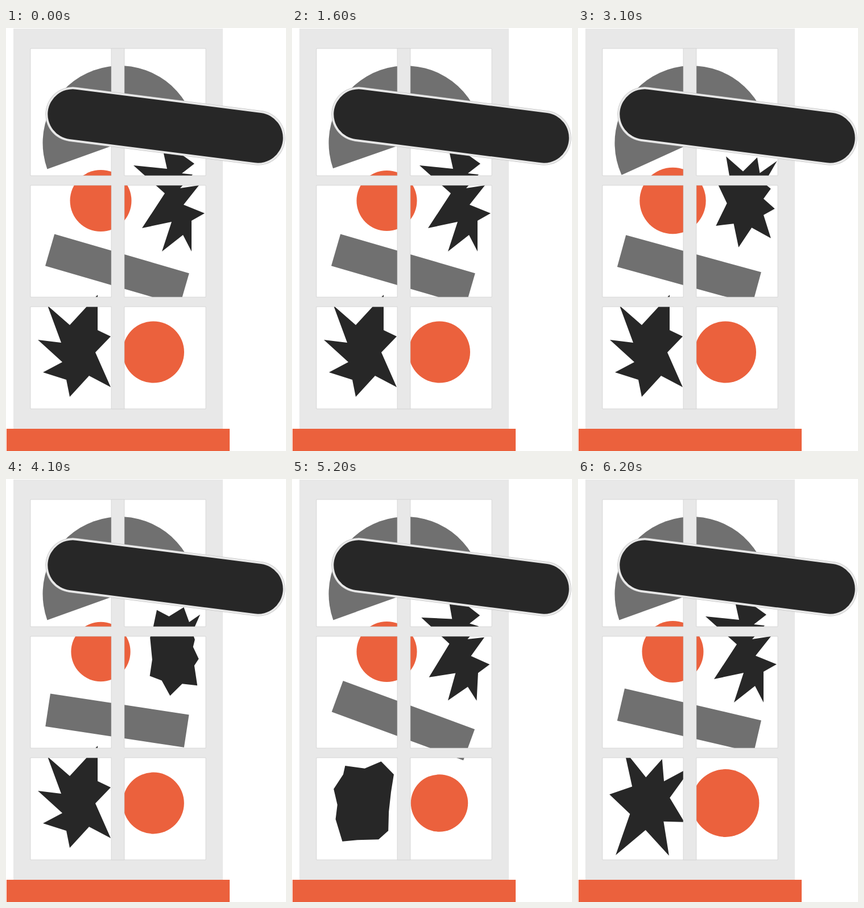
Animation, 492 px wide and 742 px high, one loop 6300 ms. Source, as an HTML page:

```html
<!DOCTYPE html>
<html lang="en">
<head>
<meta charset="utf-8">
<title>Window shapes</title>
<style>
  html, body { margin: 0; width: 100%; height: 100%; overflow: hidden; background: #fff; }
  svg { display: block; width: 492px; height: 742px; }
  .ink { fill: #272727; }
  .grey { fill: #707070; }
  .orange { fill: #eb613d; }
  .frame { fill: #e8e8e8; }
  .edge { fill: none; stroke: #c6c6c6; stroke-width: .6; }
  .pill { fill: none; stroke-linecap: round; }
</style>
</head>
<body>
<svg viewBox="0 0 492 742">
  <path id="disc" class="grey" d="M-135.5 0A135.5 135.5 0 0 1 135.5 0Z"/>
  <circle id="ballA" class="orange" cx="166.5" cy="303" r="54"/>
  <polygon id="starA" class="ink" points="273,202 303,218 331,238 309,255 328,257 306,281 339,276 312,310 349,325 326,338 326,392 311,363 274,392 291,340 239,351 279,290 224,241 283,247"/>
  <rect id="bar" class="grey" x="-123.2" y="-29" width="246.4" height="58"/>
  <polygon id="starB" class="ink" points="73,487 112,521 161,468 161,530 184,541 157,569 184,630 146,610 112,647 106,617 65,604 99,586 56,547 97,552"/>
  <circle id="ballB" class="orange" cx="259" cy="568.5" r="54"/>

  <path id="frame" class="frame" fill-rule="evenodd"/>
  <path id="edges" class="edge"/>
  <rect class="orange" x="1" y="703" width="392" height="39"/>

  <g class="pill">
    <path stroke="#bdbdbd" stroke-width="96" d="M117.3 151.3L442.7 192.7"/>
    <path stroke="#e8e8e8" stroke-width="95" d="M117.3 151.3L442.7 192.7"/>
    <path stroke="#272727" stroke-width="88" d="M117.3 151.3L442.7 192.7"/>
  </g>
</svg>
<script>
const LOOP = 6300, STEP = 100;
const $ = id => document.getElementById(id);
const mix = (a, b, f) => a + (b - a) * f;
const mixPoint = (p, q, f) => [mix(p[0], q[0], f), mix(p[1], q[1], f)];
const ease = p => (1 - Math.cos(Math.PI * p)) / 2;

// Panes of the window: two columns by three rows
const columns = [[43, 185], [208, 351]];
const rows = [[36, 259], [276, 472], [489, 668]];
const panes = columns.flatMap(([x0, x1]) =>
  rows.map(([y0, y1]) => `M${x0} ${y0}H${x1}V${y1}H${x0}Z`)).join('');
$('frame').setAttribute('d', 'M13 1H381V703H13Z' + panes);
$('edges').setAttribute('d', panes + 'M185 35.7H208M185 668.3H208');

// Value at time t on a track of [time, value] keys, eased between keys
function track(keys, t) {
  const i = keys.findIndex(([time]) => time > t);
  if (i < 0) return keys[keys.length - 1][1];
  if (i === 0) return keys[0][1];
  const [t0, v0] = keys[i - 1], [t1, v1] = keys[i];
  return mix(v0, v1, ease((t - t0) / (t1 - t0)));
}

// Rocking from side to side, one second a swing, then back to rest
const swing = (start, rest, ...offsets) =>
  [0, ...offsets, 0].map((v, i) => [start + i * 1000, rest + v]);

// Shrink, swell, shrink and return
const pulse = start => [
  [start, 54], [start + 800, 47.5], [start + 2000, 60],
  [start + 3200, 47.5], [start + 4000, 54]
];

// Morph in which every notch grows into a tip of a new star, while the old
// tips sink to the midpoints of the new ones, drawn in towards the centre
function starMorph(id, centre, depth, tips) {
  const star = $(id);
  const from = Array.from(star.points, p => [p.x, p.y]);
  const to = tips.flatMap((tip, i) => {
    const middle = mixPoint(tips.at(i - 1), tip, .5);
    return [mixPoint(middle, centre, depth), tip];
  });
  return f => star.setAttribute('points',
    from.map((p, i) => mixPoint(p, to[i], f)).join(' '));
}

const morphA = starMorph('starA', [295, 300], .35, [
  [315, 227], [350, 233], [339, 282], [346, 317], [339, 369],
  [282, 385], [242, 347], [246, 275], [260, 225]
]);
const morphB = starMorph('starB', [125, 567], .48, [
  [148, 491], [202, 503], [187, 602], [160, 661],
  [66, 660], [55, 553], [81, 475]
]);

const turn = (id, x, y) => deg =>
  $(id).setAttribute('transform', `translate(${x} ${y}) rotate(${deg})`);
const size = id => r => $(id).setAttribute('r', r);

// Each part: how to pose it, and its track
const parts = [
  [turn('disc', 200, 201.7), swing(0, -19.7, -7.6, 4.7, -4.9)],
  [turn('bar', 195.4, 423.7), swing(2900, 16.2, -9, 6, -3.9)],
  [size('ballA'), pulse(1400)],
  [size('ballB'), pulse(4030)],
  [morphA, [[1680, 0], [3350, 1.05], [5580, 0]]],
  [morphB, [[4270, 0], [6290, 1]]]
];

function draw() {
  const t = Math.floor(performance.now() % LOOP / STEP) * STEP;
  for (const [pose, keys] of parts) pose(track(keys, t));
  requestAnimationFrame(draw);
}
draw();
</script>
</body>
</html>
```
